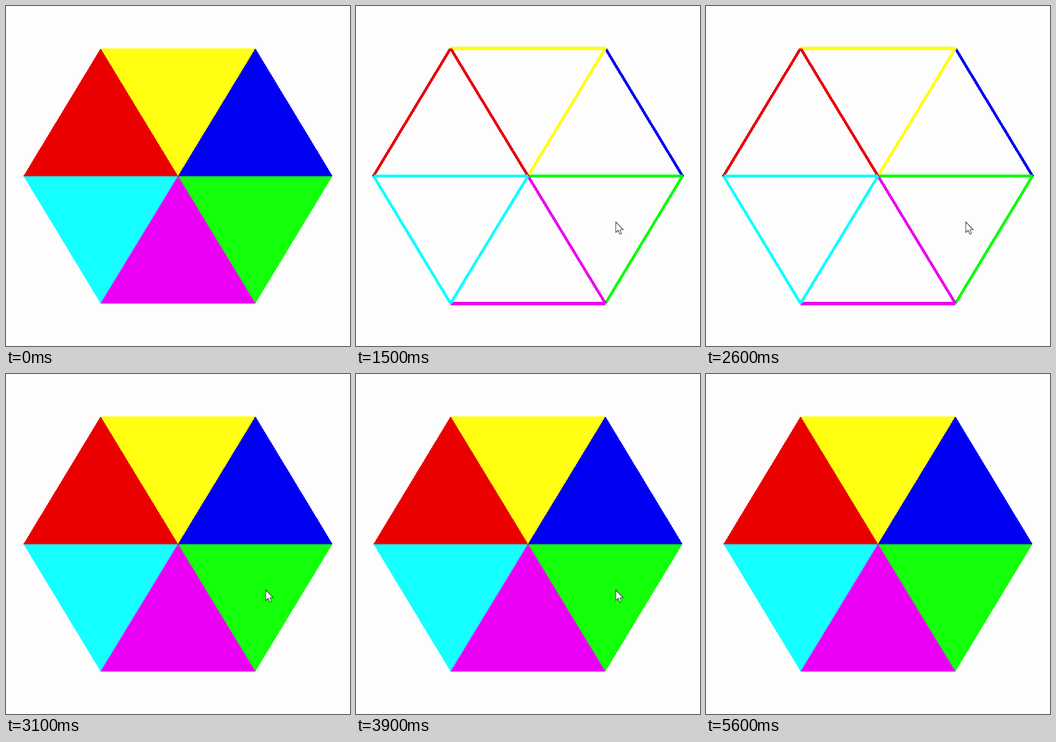
An HTML page that plays this animation: 600 px wide and 593 px high, repeating every 5700 ms.

```html
<!DOCTYPE html>
<html lang="en">
<head>
<meta charset="utf-8">
<title>Hexagon fill and wireframe</title>
<style>
  html, body { margin: 0; width: 100%; height: 100%; overflow: hidden; background: #fefdfe; }
  svg { display: block; width: 100%; height: 100%; }
  #solid, #wire { shape-rendering: crispEdges; }
  #wire { visibility: hidden; }
</style>
</head>
<body>
<svg viewBox="0 0 600 593">
  <g id="solid"></g>
  <g id="wire"></g>
  <g id="cursor" visibility="hidden">
    <path d="M.5 .5V19L4.8 15.2L7.7 22L10.8 20.7L7.9 14H13.4Z"
          fill="#fff" stroke="#44444c" stroke-width="1.2" stroke-linejoin="round"/>
  </g>
</svg>
<script>
const LOOP = 5700;
const LINE = 5.6;
const points = {
  center: [300, 296.5],
  left: [30.5, 296.5], right: [569.5, 296.5],
  topLeft: [165, 74], topRight: [435, 74],
  bottomLeft: [165, 518.7], bottomRight: [435, 518.7]
};

const triangles = [
  ['#eb0000', 'left', 'topLeft'],
  ['#ffff0f', 'topLeft', 'topRight'],
  ['#0000f5', 'topRight', 'right'],
  ['#14ff0a', 'right', 'bottomRight'],
  ['#eb00f5', 'bottomRight', 'bottomLeft'],
  ['#14ffff', 'bottomLeft', 'left']
];

// Later edges cover earlier ones at shared corners.
const edges = [
  ['#0000ee', 'topRight', 'right'],
  ['#00ff00', 'right', 'bottomRight'],
  ['#00ff00', 'center', 'right'],
  ['#ffff0a', 'topLeft', 'topRight'],
  ['#ffff0a', 'center', 'topRight'],
  ['#e60005', 'left', 'topLeft'],
  ['#e60005', 'topLeft', 'center'],
  ['#eb00f0', 'center', 'bottomRight'],
  ['#eb00f0', 'bottomLeft', 'bottomRight'],
  ['#0affff', 'left', 'bottomLeft'],
  ['#0affff', 'center', 'bottomLeft'],
  ['#0affff', 'left', 'center']
];

const byId = id => document.getElementById(id);

function polygon(parent, fill, corners) {
  const shape = document.createElementNS('http://www.w3.org/2000/svg', 'polygon');
  shape.setAttribute('points', corners.join(' '));
  shape.setAttribute('fill', fill);
  parent.append(shape);
}

// Lines are thickened along one axis, so their ends are cut square to it.
function edge(parent, color, [x1, y1], [x2, y2]) {
  const flat = y1 === y2;
  const dx = flat ? 0 : LINE / 2;
  const dy = flat ? LINE / 2 : 0;
  polygon(parent, color, [
    [x1 - dx, y1 - dy], [x2 - dx, y2 - dy],
    [x2 + dx, y2 + dy], [x1 + dx, y1 + dy]
  ]);
}

// steps: [time in ms, style], each held until the next one.
function play(element, steps) {
  const frames = steps.map(([time, style]) => ({ ...style, offset: time / LOOP, easing: 'step-end' }));
  frames.push({ ...steps[steps.length - 1][1], offset: 1 });
  element.animate(frames, { duration: LOOP, iterations: Infinity });
}

for (const [color, a, b] of triangles) {
  polygon(byId('solid'), color, [points.center, points[a], points[b]]);
}
for (const [color, a, b] of edges) edge(byId('wire'), color, points[a], points[b]);

const show = on => ({ visibility: on ? 'visible' : 'hidden' });
const at = (x, y) => ({ ...show(true), transform: `translate(${x}px, ${y}px)` });
const away = { ...show(false), transform: 'translate(0px, 0px)' };

const toggles = [0, 1500, 2000, 2600, 3100, 3400, 3900];
play(byId('solid'), toggles.map((time, i) => [time, show(i % 2 === 0)]));
play(byId('wire'), toggles.map((time, i) => [time, show(i % 2 === 1)]));

play(byId('cursor'), [
  [0, away],
  [600, at(508, 380)],
  [700, at(482, 378)],
  [800, at(459, 376)],
  [900, at(452.5, 376)],
  [4300, at(436, 376)],
  [4500, at(521, 353)],
  [4800, away]
]);
</script>
</body>
</html>
```
